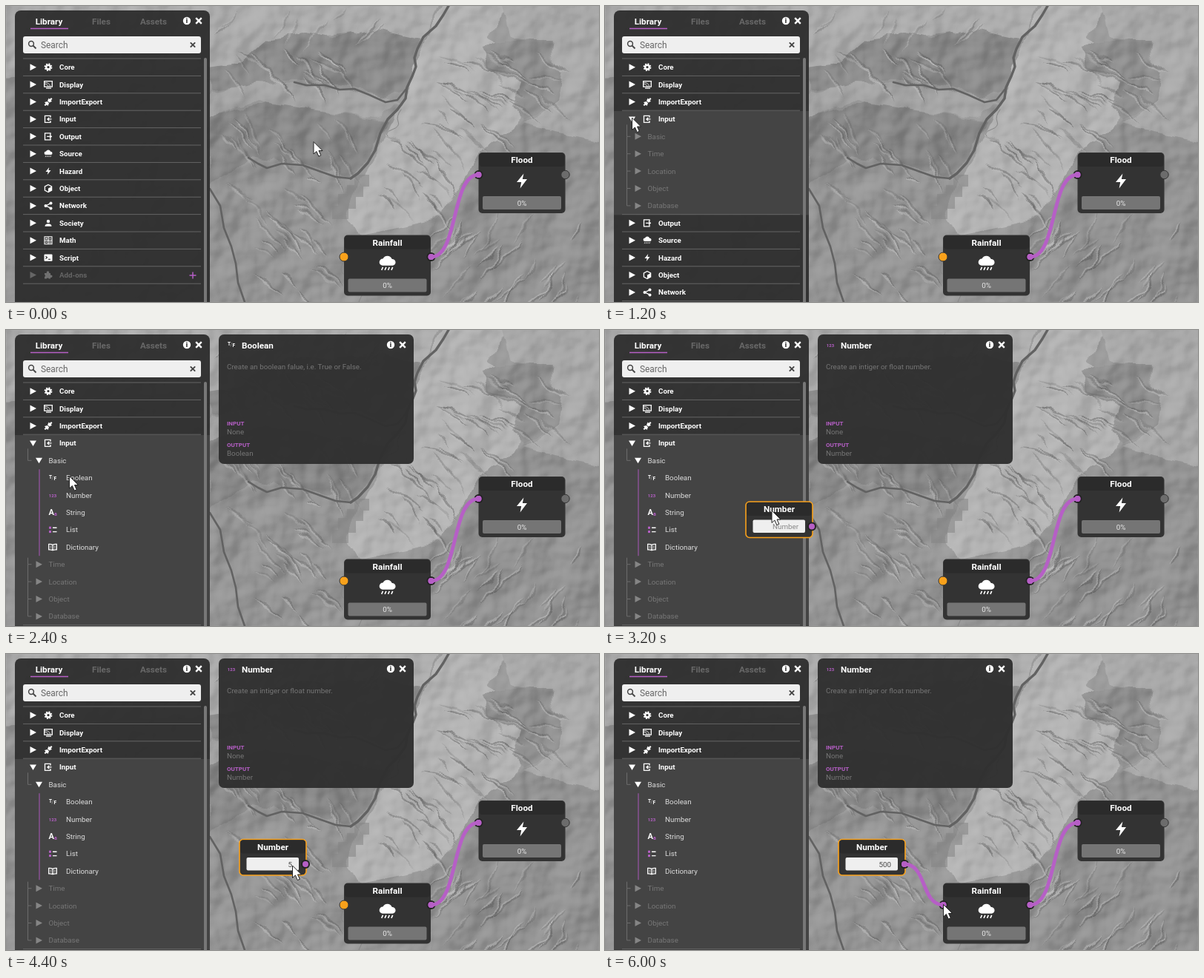
Write an HTML page that moves like this. It is 800 px wide and 400 px high and loops after 6400 ms.

```html
<!DOCTYPE html>
<html lang="en">
<head>
<meta charset="utf-8">
<title>Node library</title>
<style>
html, body { margin: 0; width: 100%; height: 100%; overflow: hidden; background: #979797; }
svg { position: absolute; left: 0; top: 0; width: 800px; height: 400px; will-change: transform; }
text { font-family: Roboto, sans-serif; dominant-baseline: central; }
</style>
</head>
<body>
<svg id="map" viewBox="0 0 800 400">
  <defs>
    <filter id="rough" x="0" y="0" width="800" height="400" filterUnits="userSpaceOnUse" color-interpolation-filters="sRGB">
      <feTurbulence type="fractalNoise" baseFrequency=".04" numOctaves="2" seed="4"/>
      <feDisplacementMap in="SourceGraphic" scale="14" xChannelSelector="R" yChannelSelector="G"/>
      <feGaussianBlur stdDeviation=".7"/>
    </filter>
    <filter id="relief" x="0" y="0" width="800" height="400" filterUnits="userSpaceOnUse" color-interpolation-filters="sRGB">
      <feTurbulence type="fractalNoise" baseFrequency=".02" numOctaves="3" seed="9"/>
      <feDiffuseLighting surfaceScale="12" lighting-color="#fff">
        <feDistantLight azimuth="225" elevation="30"/>
      </feDiffuseLighting>
    </filter>
  </defs>
  <g filter="url(#rough)">
    <path fill="#979797" d="M-40-40H840V440H-40z"/>
    <path fill="#acacac" d="M-40-40H600L560 50 470 38 400 45 340 75 275 82-40 100z"/>
    <path fill="#8a8a8a" d="M275 82L318 76 352 46 400 36 440 44 500 32 560 45 552 62 556 85 541 110 510 125 470 108 400 100 340 105 275 112z"/>
    <path fill="#a4a4a4" d="M275 115L340 103 400 108 480 116 530 130 500 150 420 140 340 128 275 150z"/>
    <path fill="#888" d="M275 150L350 130 430 142 515 155 490 205 465 230 400 213 330 203 300 230 275 240z"/>
    <path fill="#959595" d="M275 240L330 210 400 218 460 236 440 290 420 440H275z"/>
    <path fill="#b3b3b3" d="M600-30H700L650 40 690 80 700 120 690 175 640 200 615 250 575 290 480 310 460 290 475 240 500 200 540 115 558 60z"/>
    <path fill="#a8a8a8" d="M660-30H840V200L700 160 745 130 735 50 680 40z"/>
    <path fill="#909090" d="M640 55L690 45 738 45 735 70 750 90 745 130 700 155 685 135 695 105 650 85z"/>
    <path fill="#929292" d="M690 160L840 190V440H573V300L640 200z"/>
    <g id="ridges"></g>
  </g>
  <rect width="800" height="400" filter="url(#relief)" opacity=".3" style="mix-blend-mode:soft-light"/>
  <path fill="#858585" opacity=".55" d="M470 228h20v16h-8v14h-10v16h-10v14h-22v-18h8v-16h12v-12h10z"/>
  <g fill="none" stroke="#626262" stroke-width="2.6" stroke-linecap="round" stroke-linejoin="round">
    <path stroke-width="3.4" d="M597 0L590 12 580 27 563 42 555 58 551 70 553 82 548 95 541 110 539 125 528 140 515 153 505 172 498 195 488 212 475 226 465 233"/>
    <path d="M465 233L445 231 425 224 400 215 372 213 352 219 340 213 327 205"/>
    <path d="M389 103L405 107 430 107 450 113 470 112 490 120 512 130 528 127 540 112"/>
    <path d="M275 247L289 270 294 300 304 325 310 348 313 374 322 400"/>
    <path stroke="#858585" stroke-width="1" d="M533 140q-7 9-4 16t-8 11-6 9M455 346q-6 12 0 16M480 391l-4 9"/>
  </g>
</svg>
<svg id="ui" viewBox="0 0 800 400"></svg>
<script>
const PURPLE = '#b65fc6', ORANGE = '#f9a11b', DARK = '#303030';
const ui = document.getElementById('ui');

// Terrain ridges: thin tapered shadows with a lit side, scattered in a few areas
let seed = 7;
const random = () => (seed = seed * 16807 % 2147483647) / 2147483647;
function ridges(count, x, y, w, h, angle, shade) {
  let out = '';
  for (let i = 0; i < count; i++) {
    const length = 25 + random() * 40, turn = angle + random() * 36 - 18, strength = .25 + random() * .4;
    out += `<g opacity="${strength}" transform="translate(${x + random() * w} ${y + random() * h}) rotate(${turn})">
      <path fill="${shade}" d="M0 0Q${length * .4}-8 ${length} 0 ${length * .4}-2 0 0"/>
      <path fill="#bbb" d="M0 0Q${length * .4} 3 ${length} 0 ${length * .4}-2 0 0"/></g>`;
  }
  return out;
}
document.getElementById('ridges').innerHTML =
  ridges(24, 560, 60, 90, 110, 30, '#707070') + ridges(20, 500, 165, 100, 100, 40, '#747474') +
  ridges(34, 590, 275, 190, 120, 130, '#6c6c6c') + ridges(26, 290, 225, 130, 160, 40, '#707070') +
  ridges(16, 290, 55, 190, 40, 40, '#6c6c6c') + ridges(18, 290, 140, 170, 60, 50, '#6a6a6a') +
  ridges(12, 650, 55, 70, 70, 25, '#6e6e6e') + ridges(8, 300, 0, 230, 25, 140, '#888');

// Drawing helpers
const text = (x, y, label, size = 9.8, fill = '#fff', more = '') =>
  `<text x="${x}" y="${y}" font-size="${size}" fill="${fill}" ${more}>${label}</text>`;
const BOLD = 'font-weight="600"', MIDDLE = 'text-anchor="middle"', TITLE = `${BOLD} ${MIDDLE}`;
const rect = (x, y, w, h, fill, r = 0, more = '') =>
  `<rect x="${x}" y="${y}" width="${w}" height="${h}" rx="${r}" fill="${fill}" ${more}/>`;
const circle = (x, y, r, fill, more = '') => `<circle cx="${x}" cy="${y}" r="${r}" fill="${fill}" ${more}/>`;
const line = (d, stroke, width = 1) => `<path d="${d}" fill="none" stroke="${stroke}" stroke-width="${width}"/>`;
const shape = (d, fill = '#fff') => `<path d="${d}" fill="${fill}"/>`;
const outline = (d, width = 1.3) => line(d, '#fff', width);
const at = (x, y, content, scale = 1) => `<g transform="translate(${x} ${y}) scale(${scale})">${content}</g>`;
const arrow = (x, y, open, fill = '#fff') =>
  at(x, y, shape(open ? 'M-4.5-3.5h9L0 4z' : 'M-4-4.5L4.5 0-4 4.5z', fill));
const cross = (x, y, size, color, width) =>
  line(`M${x - size} ${y - size}l${2 * size} ${2 * size}m0-${2 * size}l-${2 * size} ${2 * size}`, color, width);
const port = (x, y, fill = PURPLE) => circle(x, y, 6, '#222') + circle(x, y, 4, fill);
const wire = (x1, y1, x2, y2) => {
  const bend = (x2 - x1) * .58;
  return line(`M${x1} ${y1}C${x1 + bend} ${y1} ${x2 - bend} ${y2} ${x2} ${y2}`, PURPLE, 4.8) +
    circle(x1, y1, 4, PURPLE) + circle(x2, y2, 4, PURPLE);
};
const windowButtons = (x, y) => circle(x, y, 5.2, '#fff') +
  text(x, y + .3, 'i', 8.5, '#222', `font-weight="900" ${MIDDLE}`) + cross(x + 16, y, 3.8, '#fff', 2.4);

const box = 'M3-2.2V-4.5H-4.5V4.5H3V2.2';
const icons = {
  Core: circle(0, 0, 2.8, 'none', 'stroke="#fff" stroke-width="2.4"') +
    circle(0, 0, 4.5, 'none', 'stroke="#fff" stroke-width="1.8" stroke-dasharray="1.9 1.63"'),
  Display: outline('M-5.3-4.5H5.3V3H-5.3zM-3 5H4') + line('M-5-.5Q-1-1 0 3M-5-2.6Q2-3 2.5 3', '#fff', .8),
  ImportExport: shape('M-5 .5L-1-.5 1 2-.5 5.5-2 4-4 5.5-5.5 4-3.5 2.5zM5-.8L1.5 1-1-1.5.8-5 2-3.6 4-5.4 5.5-4 3.6-2z'),
  Input: outline(box) + outline('M4.5 0H-1M1.2-2.2L-1 0 1.2 2.2'),
  Output: outline(box) + outline('M-2 0H4M2-2.2L4.3 0 2 2.2'),
  Source: shape('M-3.2 1.4a2.3 2.3 0 0 1 .2-4.6 3.3 3.3 0 0 1 6.1.2 2.2 2.2 0 0 1 .4 4.4z') +
    line('M-3 2.4l-.9 2M-.8 2.4l-.9 2M1.4 2.4l-.9 2M3.6 2.4l-.9 2', '#fff', .8),
  Hazard: shape('M1.2-5L-3.5.8H-.4L-1.2 5 3.5-1.2H.4z'),
  Object: outline('M0-5L4.6-2.5V2.5L0 5-4.6 2.5V-2.5z') + shape('M0 0L4.6-2.5V2.5L0 5z'),
  Network: outline('M4-3.5L-3.5 0 4 3.5') + circle(3.5, -3.5, 2, '#fff') + circle(-3.5, 0, 2, '#fff') + circle(3.5, 3.5, 2, '#fff'),
  Society: circle(0, -2.4, 2.2, '#fff') + shape('M-4.5 4.5Q-4.5 1 0 1T4.5 4.5z'),
  Math: outline('M-5-5H5V5H-5zM0-5V5M-5 0H5', 1.1) + outline('M-3.8-2.5h2.6M-2.5-3.8v2.6M1.2-2.5h2.6M1.2 2h2.6M1.2 3.4h2.6M-3.5 1.5l2 2m0-2l-2 2', .8),
  Script: rect(-5.5, -4.7, 11, 9.4, '#fff', 1) + line('M-3.5-2l2 1.7-2 1.7M0 2.2h3', '#222', 1.1),
  'Add-ons': shape('M-5-2.5H-2a1.8 1.8 0 1 1 3 0H3V.2a1.7 1.7 0 1 1 0 3V5H.7a1.7 1.7 0 0 0-3 0H-5V2.6a1.7 1.7 0 0 0 0-3z', '#707070'),
  Boolean: text(-5, -1, 'T', 6.5, '#fff', BOLD) + text(-1.6, 0, '/', 6.5, '#aaa') + text(1.5, 1, 'F', 6.5, '#fff', BOLD),
  Number: text(0, .2, '123', 6, PURPLE, TITLE),
  String: text(-5.5, 0, 'A', 11, '#fff', BOLD) + text(2, 2, 'a', 7, PURPLE, BOLD),
  List: rect(-5, -4.2, 3, 3, PURPLE) + rect(-5, 1.2, 3, 3, PURPLE) + outline('M0-2.7H5.5M0 2.7H5.5', 1.4),
  Dictionary: outline('M0-3Q-2-4-5.3-3.8V3.6Q-2 3.4 0 4.4 2 3.4 5.3 3.6V-3.8Q2-4 0-3V4') + line('M-3.5-1h2M-3.5 1h2M1.5-1h2M1.5 1h2', '#fff', .7),
};
const sections = Object.keys(icons).slice(0, 13), values = Object.keys(icons).slice(13);
const groups = ['Basic', 'Time', 'Location', 'Object', 'Database'];
const descriptions = {
  Boolean: 'Create an boolean falue, i.e. True or False.',
  Number: 'Create an intiger or float number.',
};

const rowY = row => 82.7 + 23.4 * row;
const divider = row => line(`M23 ${71 + 23.4 * row}H263`, '#646464');

function tree(basicLit, basicOpen) {
  let out = '', row = 4;
  groups.forEach((label, i) => {
    const y = rowY(row++), lit = i == 0 && basicLit, open = i == 0 && basicOpen;
    out += line(`M29.5 ${i == 1 && basicOpen ? y - 9 : y - (i ? 23.4 : 16)}V${y}h5`, '#6c6c6c') +
      arrow(44.5, y, open, lit ? '#fff' : '#858585') + text(57.5, y, label, 9.8, lit ? '#ddd' : '#777');
    if (open) {
      out += line(`M45 ${y + 12}V${y + 129}`, '#9a55a8', 1.2);
      for (const value of values) {
        const valueY = rowY(row++);
        out += at(63, valueY, icons[value]) + text(81, valueY, value, 9.8, '#ddd');
      }
    }
  });
  return out;
}

function library({ hover, open, basicLit, basicOpen }) {
  const extra = open ? (basicOpen ? 10 : 5) : 0;
  let row = 0, out = rect(12, 6, 263, 410, DARK, 8, 'opacity=".97"');
  if (hover || open) out += rect(12, 142, 263, 23.4 * (1 + extra), '#444');
  out += text(58, 20.5, 'Library', 11.7, '#fff', TITLE) +
    text(128.5, 20.5, 'Files', 11.7, '#686868', TITLE) +
    text(199, 20.5, 'Assets', 11.7, '#686868', TITLE) +
    line('M33 30.5H84', PURPLE, 1.4) + windowButtons(244, 20) +
    rect(23, 41, 240, 23, '#efefef', 3) + circle(34, 51, 3.4, 'none', 'stroke="#444" stroke-width="1.5"') +
    line('M36.5 53.5l4 4', '#444', 1.8) + text(47, 53, 'Search', 11.9, '#666') + cross(252, 52.5, 3.2, '#444', 1.9) +
    rect(267, 70, 4, 340, '#777', 2);
  for (const name of sections) {
    const y = rowY(row), dim = name == 'Add-ons', opened = name == 'Input' && open;
    out += divider(row) + arrow(36.5, y, opened, dim ? '#666' : '#fff') +
      at(57, y, icons[name]) + text(72, y, name, 9.75, dim ? '#666' : '#fff', BOLD);
    if (dim) out += line(`M247.5 ${y + .6}h9m-4.5-4.5v9`, PURPLE, 1.5);
    if (opened) out += tree(basicLit, basicOpen);
    row += opened ? 1 + extra : 1;
  }
  return out + divider(row);
}

const infoPanel = type => rect(287, 6, 263, 175, DARK, 7, 'opacity=".97"') + at(304, 20, icons[type]) +
  text(318, 20.5, type, 11.7, '#fff', BOLD) + windowButtons(519, 20) +
  text(298, 49, descriptions[type], 9.8, '#757575') +
  text(298, 126, 'INPUT', 8, PURPLE, BOLD) + text(298, 137, 'None', 9.8, '#757575') +
  text(298, 155.3, 'OUTPUT', 8, PURPLE, BOLD) + text(298, 166.3, type, 9.8, '#757575');

const card = (x, y, w, h, title, more) => rect(x, y, w, h, '#333', 5, more) +
  rect(x + 1, y + 1, w - 2, 18, '#2b2b2b', 4) + text(x + w / 2, y + 10, title, 11.7, '#fff', TITLE);
const processNode = (x, y, title, icon) => card(x, y, 117, 82, title) + at(x + 58.5, y + 38.5, icons[icon], 2) +
  rect(x + 5.5, y + 59, 106, 18, '#757575', 2) + text(x + 58.5, y + 68, '0%', 9.8, '#e8e8e8', MIDDLE);
const numberNode = (x, y, value) => card(x, y, 90, 48.5, 'Number', `stroke="${ORANGE}" stroke-width="1.6"`) +
  rect(x + 9.5, y + 24.5, 70.5, 17.5, '#efefef', 2) +
  text(x + 71, y + 33.5, value || 'Number', 9.8, value ? '#444' : '#888', 'text-anchor="end"') + port(x + 89, y + 33.5);

const pointer = ([x, y]) => at(x, y,
  '<path d="M0 0V16.5L3.9 13 6.8 19.6 9.8 18.3 7 12H12z" fill="#fff" stroke="#222" stroke-width="1" stroke-linejoin="round"/>');

// Each state lasts one step and inherits whatever it does not change
const STEP = 400;
const states = [
  { cursor: [415, 183.5] },
  { cursor: [150, 156], hover: true },
  { cursor: [36.5, 151] },
  { open: true },
  { cursor: [45, 174.5], basicLit: true },
  { basicOpen: true },
  { cursor: [85.5, 197.5], info: 'Boolean' },
  { cursor: [85.5, 221], info: 'Number' },
  { cursor: [225, 244], node: [190, 232] },
  { cursor: [350, 262], node: [315, 250.5] },
  { cursor: [386.5, 286] },
  { value: '5' },
  { value: '50' },
  { cursor: [403.5, 282], value: '500' },
  { cursor: [432, 312], link: [432, 312] },
  { cursor: [456.5, 338.5], link: [456.5, 339] },
];
states.forEach((state, i) => { states[i] = { ...states[i - 1], ...state }; });

function scene(state) {
  const { info, node, value, link, cursor } = state;
  const connected = link && link[0] > 456;
  return processNode(456, 309.5, 'Rainfall', 'Source') + processNode(637.5, 198, 'Flood', 'Hazard') +
    port(573.5, 339) + port(637.5, 228) + wire(573.5, 339, 637.5, 228) +
    circle(754.5, 228, 5.7, '#6c6c6c', 'stroke="#333"') +
    (connected ? port(456.5, 339) : circle(456, 339, 6, ORANGE, 'stroke="#333"')) +
    library(state) + (info ? infoPanel(info) : '') + (node ? numberNode(...node, value) : '') +
    (link ? wire(404, 284, ...link) : '') + pointer(cursor);
}

let shown = -1;
function draw() {
  const step = Math.floor(performance.now() / STEP) % states.length;
  if (step != shown) ui.innerHTML = scene(states[shown = step]);
  requestAnimationFrame(draw);
}
draw();
</script>
</body>
</html>
```
